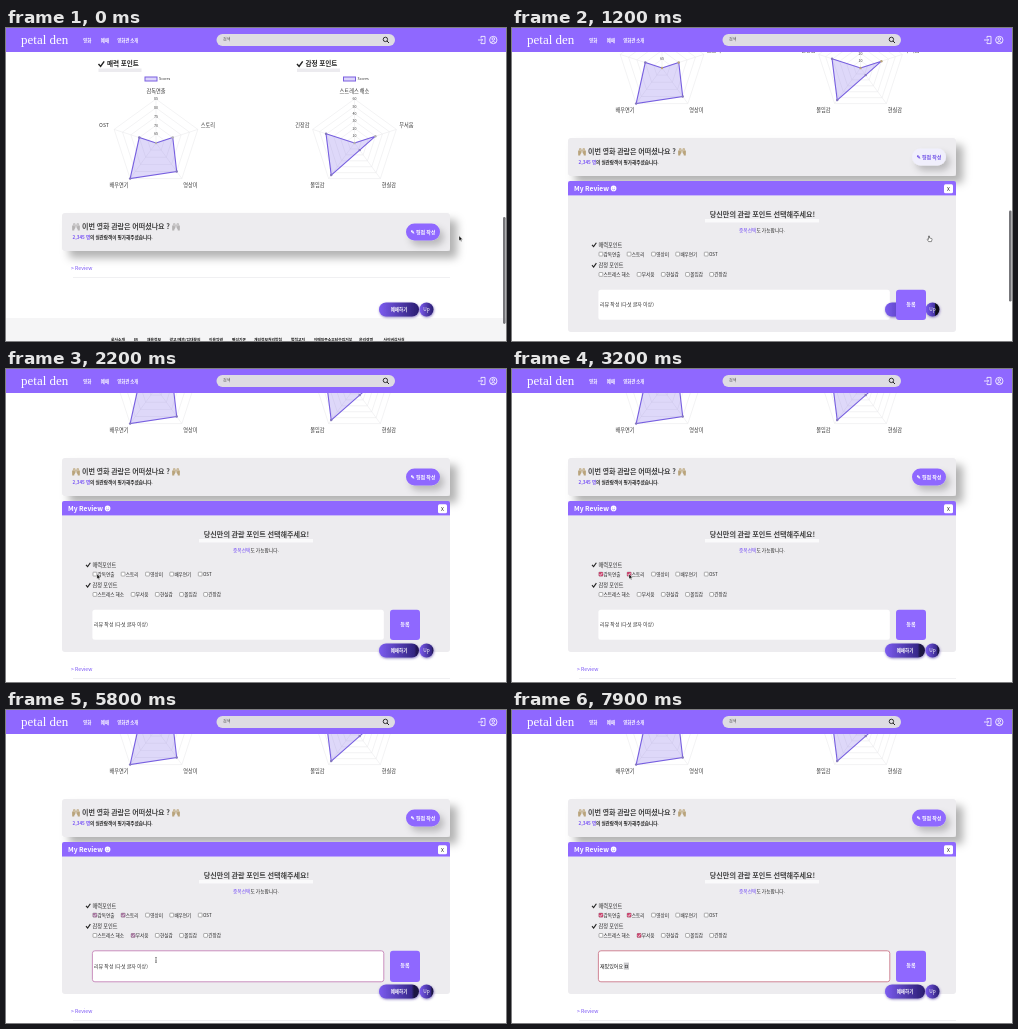
Animation of 500x313 px, one loop 8000 ms. Source, as an HTML page:

```html
<!DOCTYPE html>
<html>
<head>
<meta charset="utf-8">
<title>Movie review form</title>
<style>
  html, body { margin: 0; width: 100%; height: 100%; overflow: hidden; background: #fff; }
  svg { display: block; width: 100%; height: 100%; }
  text { font-family: "Noto Sans CJK KR", "Noto Sans CJK JP", "Noto Sans", sans-serif; white-space: pre; }
  .logo { font-family: "Liberation Serif", serif; }
</style>
</head>
<body>
<svg id="stage" viewBox="0 0 500 313"></svg>
<script>
const LOOP = 8000;
const VIOLET = '#8f68ff', PANEL = '#edecef', INK = '#222';
const PANEL_H = 156;
const stage = document.getElementById('stage');
const $ = id => document.getElementById(id);

// --- markup helpers (text is placed by its vertical centre) ---
const text = (x, y, str, size, fill = INK, weight = 500, anchor = 'start', extra = '') =>
  `<text x="${x}" y="${y + size * 0.36}" font-size="${size}" fill="${fill}" font-weight="${weight}" text-anchor="${anchor}" ${extra}>${str}</text>`;
const mid = (x, y, str, size, fill, weight) => text(x, y, str, size, fill, weight, 'middle');
const rect = (x, y, w, h, fill, r = 0, extra = '') =>
  `<rect x="${x}" y="${y}" width="${w}" height="${h}" rx="${r}" fill="${fill}" ${extra}/>`;
const path = (d, extra) => `<path d="${d}" ${extra}/>`;
const group = (id, body) => `<g id="${id}">${body}</g>`;
const tick = (x, y, s, color = INK) =>
  path(`M${x} ${y}l${s * 0.35} ${s * 0.4}l${s * 0.6} ${-s * 0.85}`, `fill="none" stroke="${color}" stroke-width="${s * 0.24}"`);

// --- radar charts ---
const R = 44, CY = 19;
const spoke = (cx, i, r) => {
  const a = (i * 72 - 90) * Math.PI / 180;
  return [cx + r * Math.cos(a), CY + r * Math.sin(a)].map(v => v.toFixed(2));
};
const ring = (cx, radii) => radii.map((r, i) => spoke(cx, i, r).join()).join(' ');

function radar(cx, title, labels, values, ticks) {
  const n = ticks.length, tx = cx - 57.5;
  let out = rect(tx, -55.5, 43, 3.5, '#ecebef');
  out += tick(tx, -60, 6) + text(tx + 8.5, -60, title, 6.6, INK, 700);
  out += rect(cx - 11, -47, 12, 4, '#dcd5fb', 0, 'stroke="#7a5fe0" stroke-width="1"');
  out += text(cx + 3, -45, 'Scores', 3.6, '#333');
  for (let k = 1; k <= n; k++)
    out += `<polygon points="${ring(cx, Array(5).fill(R * k / n))}" fill="none" stroke="#e6e6e8" stroke-width=".5"/>`;
  for (let i = 0; i < 5; i++)
    out += path(`M${cx} ${CY}L${spoke(cx, i, R)}`, 'stroke="#e6e6e8" stroke-width=".5"');
  const radii = values.map(v => v * R);
  out += `<polygon points="${ring(cx, radii)}" fill="#7d66e8" fill-opacity=".25" stroke="#775fe0" stroke-width="1.1"/>`;
  radii.forEach((r, i) => {
    const [x, y] = spoke(cx, i, r);
    out += `<circle cx="${x}" cy="${y}" r="1.2" ${i < 2 ? 'class="tone"' : ''} fill="#8578bd"/>`;
  });
  ticks.forEach((v, k) => out += mid(cx, CY - R * (k + 1) / n, v, 3.6, '#444'));
  const spots = [[0, -32.5], [52, 0.7], [34.5, 61], [-37, 61], [-52, 0.7]];
  labels.forEach((s, i) => out += mid(cx + spots[i][0], spots[i][1], s, 5.2, '#333'));
  return out;
}

// --- page parts ---
const hand = (x, flip) =>
  `<g transform="translate(${x} 102.8) scale(${flip} 1)"><path class="tone" d="M.4 3.6L.3 -.2Q.2 -1.4 1 -1.2L1.4 -3.6L2.2 -3.4L2.5 -3.8L3.1 -3.3L3.5 -3.2L3.6 -2.3L4.1 -1.7L3.5 1.3L2.6 2.4L2.4 3.8Z"/>` +
  path('M1.9 -3L1.8 -.8M2.7 -3L2.4 -.7M3.4 -2.3L3 -.4', 'stroke="#fff" stroke-width=".3" fill="none" opacity=".8"') + '</g>';
const hands = x => hand(x - 4.2, 1) + hand(x + 4.2, -1);

const invite =
  rect(56, 89, 388, 38, PANEL, 3, 'filter="url(#deep)"') +
  hands(70) + hands(170) +
  text(76, 102.8, '이번 영화 관람은 어떠셨나요 ?', 7.05, '#444', 700) +
  text(66.5, 113.6, `<tspan fill="#7a55f5">2,345 명</tspan>의 실관람객이 평가해주셨습니다.`, 4.6, INK, 700) +
  rect(400, 99.6, 34, 17, VIOLET, 8.5, 'id="rate" filter="url(#soft)"') +
  text(417, 107.9, '✎ 평점 작성', 5, '#fff', 700, 'middle', 'id="rateText"');

const checks = [];
function option(x, y, label) {
  const id = 'box' + checks.length;
  checks.push(id);
  return rect(x, y - 2, 3.8, 3.8, '#fff', 0.5, 'stroke="#666" stroke-width=".5"') +
    `<g id="${id}" visibility="hidden">` + rect(x - 0.2, y - 2.2, 4.2, 4.2, '#c8456f', 0.6, 'class="accent"') +
    tick(x + 0.6, y, 2.8, '#fff') + '</g>' + text(x + 4.6, y, label, 4.6, INK);
}
const options = (y, xs, labels) => labels.map((s, i) => option(xs[i], y, s)).join('');

const form =
  path('M56 146.7V134Q56 132 58 132H442Q444 132 444 134V146.7Z', `fill="${VIOLET}"`) +
  path('M56 146.7H444V280Q444 283 441 283H59Q56 283 56 280Z', `id="sheet" fill="${PANEL}"`) +
  path('M56 146.7H444V150H56Z', `fill="${PANEL}"`) +
  text(62, 139.4, 'My Review', 6.7, '#fff', 700) +
  '<circle cx="101.6" cy="139.4" r="2.8" fill="#fff"/>' +
  path('M100.3 138.8h.6M102.3 138.8h.6M100.1 140.1q1.5 1.6 3 0', `stroke="${VIOLET}" stroke-width=".6" fill="none"`) +
  rect(432, 135.2, 9, 9, '#fff', 1.5) + mid(436.5, 139.7, 'X', 5, INK, 500) +
  rect(193, 170, 114, 3.5, '#fafafb') +
  mid(250.5, 165, '당신만의 관람 포인트 선택해주세요!', 7.1, '#444', 700) +
  mid(250, 181.6, `<tspan fill="#7a55f5">중복선택</tspan>도 가능합니다.`, 4.75, INK, 500) +
  tick(80, 195.8, 4.6) + text(86.5, 195.8, '매력포인트', 5.2) +
  options(205.2, [87, 115.2, 139.6, 163.8, 192.3], ['감독연출', '스토리', '영상미', '배우연기', 'OST']) +
  tick(80, 216.2, 4.6) + text(86.5, 216.2, '감정 포인트', 5.2) +
  options(225.5, [87, 125.2, 149.4, 173.6, 197.7], ['스트레스 해소', '무서움', '현실감', '몰입감', '긴장감']) +
  rect(86.4, 240.8, 291.4, 30, '#fff', 2.5, 'id="field"') +
  rect(0, 252.6, 5.2, 7, '#c9c9cc', 0, 'id="compose"') +
  text(88, 255.5, '', 5, '#333', 500, 'start', 'id="entry"');

const links = [[112, '회사소개'], [130, 'IR'], [148, '채용정보'], [179, '광고/제휴/임대문의'], [210, '이용약관'],
  [233, '편성기준'], [262, '개인정보처리방침'], [292, '법적고지'], [327, '이메일주소무단수집거부'], [360, '윤리경영'], [388, '사이버감사실']];
const tail =
  text(65, 144.2, '&gt; Review', 5.2, '#7a55f5') +
  rect(67, 153.2, 377, 0.6, '#e6e6e9') +
  rect(0, 194, 500, 70, '#f5f5f6') +
  links.map(([x, s], i) => mid(x, 216, s, 3.8, '#111', i === 6 ? 900 : 700)).join('');

const floating =
  rect(373, 274.5, 40, 14, 'url(#pill)', 7, 'filter="url(#glow)"') +
  mid(393, 281.5, '예매하기', 4.5, '#fff', 700) +
  '<circle cx="420.5" cy="281.5" r="7" fill="url(#disc)" filter="url(#glow)"/>' +
  mid(420.5, 281.5, 'Up', 4.8, '#fff', 500);

const submit = rect(384, 240.8, 30, 30.2, VIOLET, 3, 'id="send"') + mid(398.9, 255.6, '등록', 5.1, '#fff', 700);

const line = 'fill="none" stroke="#fff" stroke-width=".8"';
const header =
  rect(0, 0, 500, 24, VIOLET) +
  text(15, 11.2, 'petal den', 13, '#fff', 400, 'start', 'class="logo"') +
  text(77, 12, '영화', 4.5, '#fff', 700) + text(94.8, 12, '예매', 4.5, '#fff', 700) + text(111.3, 12, '영화관 소개', 4.35, '#fff', 700) +
  rect(210.5, 6, 178.5, 12, '#dedce3', 6) + text(217, 12, '검색', 4, '#555') +
  '<circle cx="379.4" cy="11.4" r="2.2" fill="none" stroke="#222" stroke-width=".9"/>' +
  path('M381 13l2 2', 'stroke="#222" stroke-width="1"') +
  path('M475 10V8.4H479V15.6H475V14M472 12H476.6M475.2 10.6L476.6 12L475.2 13.4', line) +
  `<circle cx="487.3" cy="12" r="3.7" ${line}/><circle cx="487.3" cy="11" r="1.3" ${line}/>` +
  path('M484.9 14.6q2.4 -2.6 4.8 0', line);

const cursors =
  path('M0 0V5L1.2 4L2 5.8L2.9 5.4L2.1 3.7H3.7Z', 'id="arrow" fill="#111" stroke="#fff" stroke-width=".4"') +
  path('M-.5 0Q0 -.7 .5 0V2L2.7 2.5Q3.2 2.7 3 3.6L2.4 5.6H-.4L-1.9 3.4Q-1.6 2.7 -.5 3.4Z', 'id="finger" fill="#fff" stroke="#222" stroke-width=".5"') +
  path('M-.8 -2.6Q0 -2.6 0 -2V2Q0 2.6 -.8 2.6M.8 -2.6Q0 -2.6 0 -2M0 2Q0 2.6 .8 2.6M-.5 .9H.5', 'id="beam" fill="none" stroke="#222" stroke-width=".5"');

const shadow = (id, dx, dy, blur, color, alpha) =>
  `<filter id="${id}" x="-40%" y="-60%" width="190%" height="260%"><feDropShadow dx="${dx}" dy="${dy}" stdDeviation="${blur}" flood-color="${color}" flood-opacity="${alpha}"/></filter>`;
const fade = (id, x1, x2) =>
  `<linearGradient id="${id}" gradientUnits="userSpaceOnUse" x1="${x1}" x2="${x2}" y1="0" y2="0">` +
  '<stop offset="0" stop-color="#7c5cf0"/><stop class="body"/><stop class="edge"/><stop offset="1" class="end"/></linearGradient>';

stage.innerHTML =
  '<defs>' + shadow('deep', 7, 7, 4, '#000', 0.3) + shadow('soft', 4, 5, 3.5, '#000', 0.22) +
  shadow('glow', 0.5, 1, 1.2, '#4a35a0', 0.6) + fade('pill', 373, 413) + fade('disc', 413.5, 427.5) + '</defs>' +
  rect(0, 0, 500, 313, '#fff') +
  group('page',
    radar(150, '매력 포인트', ['감독연출', '스토리', '영상미', '배우연기', 'OST'], [0, 0.4, 0.8, 1, 0.4], [65, 70, 75, 80, 85]) +
    radar(348.5, '감정 포인트', ['스트레스 해소', '무서움', '현실감', '몰입감', '긴장감'], [0, 0.5, 0.2, 0.9, 0.68], [10, 20, 30, 40, 50, 60]) +
    group('tail', tail) + invite + group('form', form)) +
  group('floating', floating) + group('submit', submit) + group('header', header) +
  rect(497, 0, 2.6, 100, '#77777b', 1.3, 'id="thumb"') + group('cursor', cursors);

// --- timeline ---
function tween(keys, t, ease = k => k) {
  let i = 0;
  while (i < keys.length - 2 && t >= keys[i + 1][0]) i++;
  const [a, b] = [keys[i], keys[i + 1]];
  const k = ease(Math.min(1, Math.max(0, (t - a[0]) / (b[0] - a[0]))));
  return a.slice(1).map((v, j) => v + (b[j + 1] - v) * k);
}
const smooth = k => k * k * (3 - 2 * k);

const scrollKeys = [[0, 96], [800, 96], [900, 91.5], [1000, 74], [1200, 21], [1400, 5], [1700, 0]];
const mouseKeys = [[0, 453, 207.8], [400, 417, 208], [1700, 417, 208], [2100, 91, 205], [2600, 90, 205], [3000, 117, 205],
  [3600, 117, 205], [4100, 127, 226], [4700, 127, 226], [5000, 150, 250], [5800, 150, 250]];
const OPEN = 600, FOCUS = 5000, TYPE = 6000;
const ticked = { box0: 2400, box1: 3100, box6: 4200 };
const typed = ['ㅈ', '재', '잼', '재미', '재밌', '재밌ㅇ', '재밌이', '재밌있', '재밌있ㅇ', '재밌있어', '재밌있엉', '재밌있어요', '재밌있어요 ', '재밌있어요 ㅁ'];

const set = (el, attrs) => { for (const k in attrs) el.setAttribute(k, attrs[k]); };
const show = (el, on) => el.setAttribute('visibility', on ? 'visible' : 'hidden');
const each = (cls, attrs) => stage.querySelectorAll('.' + cls).forEach(el => set(el, attrs));

function drawEntry(t) {
  const el = $('entry'), typing = t >= TYPE;
  const str = typing ? typed[Math.min(typed.length - 1, Math.floor((t - TYPE) / 140))] : '리뷰 작성 (다섯 글자 이상)';
  if (el.textContent !== str) el.textContent = str;
  set(el, { fill: typing ? '#111' : '#333', y: 257.2 + (t >= FOCUS ? 0.6 : 0) });
  const composing = typing && !str.endsWith(' ');
  show($('compose'), composing);
  if (composing) set($('compose'), { x: el.getStartPositionOfChar(str.length - 1).x - 0.3 });
}

function draw(t) {
  const [offset] = tween(scrollKeys, t);
  const open = t >= OPEN, focus = t >= FOCUS, grow = focus ? 1 : 0;
  const move = `translate(0 ${offset})`;
  set($('page'), { transform: move });
  set($('submit'), { transform: move });
  for (const id of ['form', 'submit']) set($(id), { display: open ? 'inline' : 'none' });
  set($('tail'), { transform: `translate(0 ${open ? PANEL_H + grow : 0})` });

  const hover = t >= 300 && t <= 1700;
  set($('rate'), { fill: hover ? '#f0effc' : VIOLET });
  set($('rateText'), { fill: hover ? '#6f50e6' : '#fff' });
  each('tone', { fill: t < 500 ? '#b5b3b4' : t < 1100 ? '#e0aa45' : '#b9a47c' });

  for (const id of checks) show($(id), t >= (ticked[id] ?? Infinity));
  const muted = t >= 5100 && t < 6500;
  each('accent', { fill: muted ? '#a5769f' : '#c8456f' });
  set($('field'), { height: 30 + grow, stroke: focus ? (muted ? '#c685b8' : '#cc7a8c') : 'none', 'stroke-width': 0.9 });
  set($('send'), { height: 30.2 + grow });
  set($('sheet'), { transform: `translate(0 ${grow})` });
  drawEntry(t);

  // dark edge sweeping in and out of the floating buttons
  const dark = Math.sin(Math.PI * t / 2600) ** 2;
  const cut = 1 - 0.28 * dark;
  const night = `rgb(${42 - 28 * dark},${27 - 13 * dark},${104 - 84 * dark})`;
  each('body', { offset: cut - 0.06, 'stop-color': `rgb(${46 + 20 * dark},${32 + 18 * dark},${120 + 40 * dark})` });
  each('edge', { offset: cut, 'stop-color': night });
  each('end', { 'stop-color': night });

  const total = open ? 1077 : 916;
  set($('thumb'), {
    y: (649 - offset) / total * 313, height: 313 * 313 / total,
    opacity: Math.min(1, Math.max(0, (2200 - t) / 300))
  });

  const [x, y] = tween(mouseKeys, t, smooth);
  set($('cursor'), { transform: `translate(${x} ${y})` });
  const overField = t >= 4900;
  show($('finger'), hover);
  show($('arrow'), !hover && !overField);
  show($('beam'), overField && t < TYPE);
}

const start = performance.now();
function frame() {
  const t = (performance.now() - start) % LOOP;
  draw(Math.floor(t / 100) * 100);
  requestAnimationFrame(frame);
}
frame();
</script>
</body>
</html>
```
